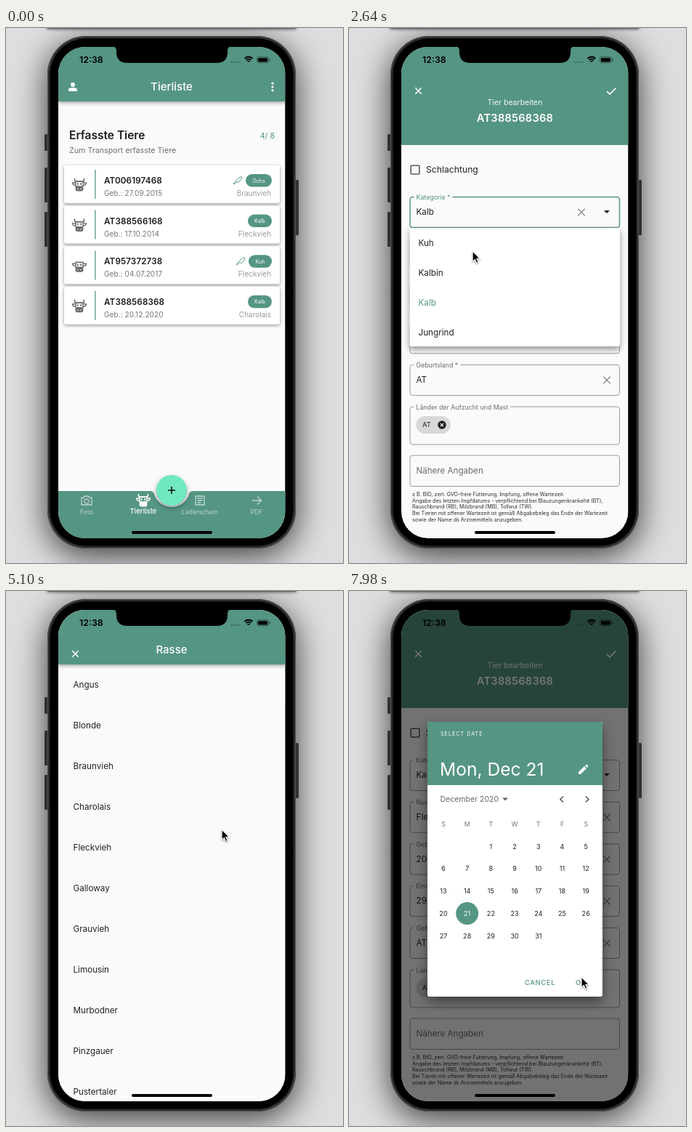
Recreate the animation shown at these times as an HTML page with a canvas. Size 464 px wide and 736 px high, loop 8000 ms.

```html
<!DOCTYPE html>
<html lang="de">
<head>
<meta charset="utf-8">
<title>Tierliste</title>
<style>
  html, body { margin: 0; width: 100%; height: 100%; overflow: hidden; background: #dedee1; }
  canvas { display: block; width: 464px; height: 736px; }
</style>
</head>
<body>
<canvas id="stage"></canvas>
<script>
const W = 464, H = 736, LOOP = 8000;
const canvas = document.getElementById('stage');
const ratio = window.devicePixelRatio || 1;
canvas.width = W * ratio;
canvas.height = H * ratio;
const c = canvas.getContext('2d');

const TEAL = '#559583', PAPER = '#fafafa', INK = '#222', GREY = '#757575';
const LEFT = 72, TOP = 26, WIDE = 312.5, TALL = 676;

const clamp = (v, lo = 0, hi = 1) => Math.min(hi, Math.max(lo, v));
const ramp = (t, a, b) => clamp((t - a) / (b - a));
const mix = (a, b, k) => a + (b - a) * k;
const smooth = k => k * k * (3 - 2 * k);

// ---------- drawing helpers ----------
function text(str, x, middle, size, color, { weight = 400, align = 'left', spacing = 0 } = {}) {
  c.font = `${weight} ${size}px Inter, "Open Sans", sans-serif`;
  c.letterSpacing = spacing + 'px';
  c.textAlign = align;
  c.fillStyle = color;
  c.fillText(str, x, middle + size * 0.36);
}
function box(x, y, w, h, r, fill, stroke, width = 1) {
  c.beginPath();
  c.roundRect(x, y, w, h, r);
  if (fill) { c.fillStyle = fill; c.fill(); }
  if (stroke) { c.strokeStyle = stroke; c.lineWidth = width; c.stroke(); }
}
function disc(x, y, r, fill) {
  c.beginPath();
  c.arc(x, y, r, 0, 7);
  c.fillStyle = fill;
  c.fill();
}
function icon(d, x, y, { stroke, fill, width = 1.3 }) {
  const path = new Path2D(d);
  group(() => {
    c.translate(x, y);
    c.lineWidth = width;
    if (fill) { c.fillStyle = fill; c.fill(path); }
    if (stroke) { c.strokeStyle = stroke; c.stroke(path); }
  });
}
function group(draw) { c.save(); draw(); c.restore(); }
function shadowed(blur, dy, alpha, draw) {
  group(() => {
    c.shadowBlur = blur * ratio;
    c.shadowOffsetY = dy * ratio;
    c.shadowColor = `rgba(0,0,0,${alpha})`;
    draw();
  });
}
const cross = (x, y, r, stroke, width = 1.2) =>
  icon(`M${-r} ${-r}L${r} ${r}M${r} ${-r}L${-r} ${r}`, x, y, { stroke, width });
const triangle = (x, y) => icon('M-4-2H4L0 2Z', x, y, { fill: INK });

function cow(x, y, color, horns = true) {
  if (horns) icon('M-6-9C-8-4-4-5-2-5H2C4-5 8-4 6-9', x, y, { stroke: color, width: 1.6 });
  icon('M-5-5H5L5 2H-5ZM-5-3L-9.5-3Q-9 1-5 0M5-3L9.5-3Q9 1 5 0', x, y, { stroke: color, width: 1.4 });
  icon('M-4 2H4Q6 3 5.5 6Q5 8.5 3 8.5H-3Q-5 8.5-5.5 6Q-6 3-4 2ZM-3-3h1.6v3h-1.6zM1.4-3h1.6v3h-1.6z', x, y, { fill: color });
  disc(x - 2, y + 5.4, 0.8, '#fff');
  disc(x + 2, y + 5.4, 0.8, '#fff');
}

// ---------- phone ----------
function phoneBody() {
  c.fillStyle = '#dedee1';
  c.fillRect(0, 0, W, H);
  shadowed(46, 10, 0.75, () => box(57, 11, 342, 705, 53, '#29292b'));
  shadowed(4, 1, 0.6, () => box(56, -6, 344, 6.5, 2, '#444'));
  for (const [x, y, h] of [[53, 146, 23], [53, 192, 48], [53, 253, 48], [398, 209, 76]])
    box(x, y, 5, h, 1.5, '#303032');
  box(57.5, 11.5, 341, 704, 53, '#2c2c2e', '#555557');
  box(60.5, 14.5, 335, 698, 50, '#000');
}

function statusBar() {
  icon('M147 25Q152 26 152 31V33Q152 48 167 48H290Q305 48 305 33V31Q305 26 310 25Z', 0, 0, { fill: '#000' });
  text('12:38', 101, 44, 12.4, '#000', { weight: 600 });
  for (let i = 0; i < 4; i++) disc(310.5 + i * 3.7, 47, 1.1, 'rgba(0,0,0,.35)');
  c.lineCap = 'butt';
  for (const r of [3, 6, 9]) {
    c.beginPath();
    c.arc(334, 48, r - 0.8, -2.3, -0.84);
    c.strokeStyle = '#000';
    c.lineWidth = 2;
    c.stroke();
  }
  box(345.5, 39.8, 16, 8, 2.4, null, 'rgba(0,0,0,.45)');
  box(347, 41.2, 13, 5.2, 1.2, '#000');
  box(362.6, 42.3, 1.3, 3, 0.6, 'rgba(0,0,0,.5)');
  box(173, 692, 111, 4, 2, '#000');
}

// ---------- list page ----------
const animals = [
  ['AT006197468', '27.09.2015', 'Ochs', 'Braunvieh', 36, true],
  ['AT388566168', '17.10.2014', 'Kalb', 'Fleckvieh', 33, false],
  ['AT957372738', '04.07.2017', 'Kuh', 'Fleckvieh', 32, true],
  ['AT388568368', '20.12.2020', 'Kalb', 'Charolais', 33, false],
];

function appBar(title, y = TOP) {
  shadowed(5, 2, 0.35, () => box(LEFT, y, WIDE, 75, 0, TEAL));
  text(title, 228, y + 55, 15, '#fff', { weight: 500, align: 'center' });
}

function listPage() {
  box(LEFT, TOP, WIDE, TALL, 0, PAPER);
  appBar('Tierliste');
  disc(92, 78, 3, '#fff');
  icon('M-6 6V4Q-6 1 0 1Q6 1 6 4V6Z', 92, 81, { fill: '#fff' });
  for (const dy of [-4.8, 0, 4.8]) disc(367, 81 + dy, 1.6, '#fff');

  text('Erfasste Tiere', 87, 147, 15.5, '#1c1c1c', { weight: 600 });
  text('Zum Transport erfasste Tiere', 87, 168, 10.7, '#6d6d6d');
  text('4/ 8', 370, 148, 10.7, TEAL, { align: 'right' });

  animals.forEach(([tag, born, kind, breed, chip, knife], i) => {
    const y = 189 + i * 55.6;
    shadowed(4, 1.5, 0.4, () => box(80, y, 297, 52, 3, '#fff'));
    cow(101, y + 27, '#6b6b6b', i !== 2);
    box(122.3, y + 6, 1.3, 40, 0, TEAL);
    text(tag, 135, y + 21, 11.7, '#1c1c1c', { weight: 600, spacing: 0.1 });
    text('Geb.: ' + born, 135, y + 38.3, 10, '#757575', { spacing: 0.1 });
    box(366 - chip, y + 12, chip, 17.5, 8.7, TEAL);
    text(kind, 366 - chip / 2, y + 21, 7.2, '#fff', { align: 'center' });
    text(breed, 365, y + 38.3, 10, '#9a9a9a', { align: 'right' });
    if (knife) icon('M-5 5L-1 1L1 2.5L6-3Q6-6 3-5L-2 0L-6 4Z', 353 - chip + 2, y + 21, { stroke: TEAL, width: 1 });
  });
  bottomNav();
}

function bottomNav() {
  icon(`M72 637H198Q203 637 204 641A25 25 0 0 0 252 641Q253 637 258 637H385V702H72Z`, 0, 0, { fill: TEAL });
  const pale = 'rgba(255,255,255,.62)';
  icon('M-7-4H-4L-2.5-6H2.5L4-4H7V6H-7Z', 111, 650, { stroke: pale });
  c.beginPath();
  c.arc(111, 651, 3, 0, 7);
  c.stroke();
  icon('M3 0A3 3 0 1 1-3 0A3 3 0 1 1 3 0', 111, 651, { stroke: pale });
  cow(189, 650, '#fff');
  icon('M-6-6H6V6H-6ZM-3.5-3H3.5M-3.5 0H3.5M-3.5 3H1', 267, 650, { stroke: pale });
  icon('M-6 0H6M1-5.5L6.5 0L1 5.5', 345, 650, { stroke: pale });
  text('Foto', 111, 666, 8.6, pale, { align: 'center' });
  text('Tierliste', 189, 665, 9.6, '#fff', { weight: 500, align: 'center' });
  text('Lieferschein', 267, 666, 8.6, pale, { align: 'center' });
  text('PDF', 345, 666, 8.6, pale, { align: 'center' });
  shadowed(6, 3, 0.4, () => disc(228, 636, 21, '#70e8c2'));
  icon('M-5 0H5M0-5V5', 228, 636, { stroke: '#111', width: 1.6 });
}

// ---------- form page ----------
function field(label, value, y, h, { clearX = 355, focus = false } = {}) {
  box(84, y, 288.5, h, 3.5, null, focus ? TEAL : '#9a9a9a', focus ? 1.5 : 1);
  if (label) {
    c.font = '400 8.8px Inter, "Open Sans", sans-serif';
    c.letterSpacing = '0px';
    box(89.5, y - 2, c.measureText(label).width + 6, 4, 0, PAPER);
    text(label, 92.5, y + 0.5, 8.8, focus ? TEAL : '#6b6b6b');
  }
  if (value) {
    text(value, 92.5, y + 20.5, 11.7, INK);
    cross(clearX, y + 21, 4.8, '#777');
  }
}

function formPage(t) {
  box(LEFT, TOP, WIDE, TALL, 0, PAPER);
  box(LEFT, TOP, WIDE, 135, 0, TEAL);
  cross(95.5, 86.5, 4.2, '#fff', 1.5);
  icon('M-6 0L-2 4L6.5-4.5', 361, 87, { stroke: '#fff', width: 1.6 });
  text('Tier bearbeiten', 228.5, 102, 10.5, '#f2f7f5', { align: 'center' });
  text('AT388568368', 228.5, 124, 14.6, '#fff', { weight: 600, align: 'center', spacing: 0.25 });

  box(85.2, 189.2, 11.8, 11.8, 1, null, '#5c5c5c', 1.6);
  text('Schlachtung', 106, 195, 12.2, INK);
  field('Kategorie *', t >= 3300 ? 'Kalbin' : 'Kalb', 232.5, 42, { clearX: 320, focus: t >= 1800 && t < 3180 });
  triangle(355, 253);
  field('Rasse *', t >= 5340 ? 'Fleckvieh' : 'Charolais', 290.3, 42);
  field('Geburtsdatum *', '20.12.2020', 348.1, 42);
  field('Einstelldatum', '29.12.2020', 405.7, 42);
  field('Geburtsland *', 'AT', 463.4, 42);
  field('Länder der Aufzucht und Mast', '', 521, 52);
  box(92.5, 534, 47.5, 24, 12, '#d8d8d8');
  text('AT', 101, 546, 9.4, INK);
  disc(128, 546, 5.7, '#1c1c1c');
  cross(128, 546, 2.2, '#fff', 1.2);
  field('', '', 588, 42.5);
  text('Nähere Angaben', 92.5, 609, 11.6, '#6b6b6b');
  [
    'z.B. BIO, zert. GVO-freie Fütterung, Impfung, offene Wartezeit.',
    'Angabe des letzten Impfdatums - verpflichtend bei Blauzungenkrankehit (BT),',
    'Rauschbrand (RB), Milzbrand (MB), Tollwut (TW).',
    'Bei Tieren mit offener Wartezeit ist gemäß Abgabebeleg das Ende der Wartezeit',
    'sowie der Name ds Arzneimittels anzugeben.',
  ].forEach((line, i) => text(line, 87, 641.3 + i * 8.7, 7.15, '#2e2e2e'));
}

function categoryMenu(t) {
  const size = ramp(t, 1860, 2005);
  const alpha = 1 - ramp(t, 3480, 3640);
  if (!size || !alpha) return;
  group(() => {
    c.globalAlpha = alpha;
    shadowed(9, 4, 0.42, () => box(83.5, 275, 289.5 * size, 163 * size, 2, '#fff'));
    box(83.5, 316.5, 289.5 * ramp(t, 3060, 3546), 40.5, 0, '#f7f7f7');
    c.globalAlpha = alpha * ramp(t, 2160, 2280) * (1 - ramp(t, 3240, 3540));
    ['Kuh', 'Kalbin', 'Kalb', 'Jungrind'].forEach((name, i) =>
      text(name, 95.5, 296 + i * 40.8, 11.7, i === 2 ? TEAL : INK));
  });
}

// ---------- breed sheet ----------
const breeds = ['Angus', 'Blonde', 'Braunvieh', 'Charolais', 'Fleckvieh', 'Galloway',
  'Grauvieh', 'Limousin', 'Murbodner', 'Pinzgauer', 'Pustertaler'];

function breedSheet(t) {
  const opened = 1 - (1 - ramp(t, 4590, 4980)) ** 3;
  const closed = 1 - (1 - ramp(t, 5440, 5800)) ** 2;
  const shown = opened * (1 - closed);
  if (!shown) return;
  const y = mix(702, 18, shown);
  box(LEFT, y, WIDE, 8, 0, '#565a59');
  box(LEFT, y + 8, WIDE, TALL, 0, PAPER);
  appBar('Rasse', y + 8);
  cross(95.5, y + 68.5, 4.2, '#fff', 1.5);
  if (t >= 5340) box(LEFT, y + 307, WIDE, 56, 0, '#ececec');
  breeds.forEach((name, i) => text(name, 92.5, y + 111 + i * 56, 11.7, INK));
}

// ---------- date dialog ----------
function dateDialog(t) {
  const alpha = ramp(t, 6680, 6820);
  if (!alpha) return;
  const day = t >= 7500 ? 21 : 20;
  const column = i => 130 + i * 32.7;
  c.globalAlpha = alpha;
  box(LEFT, TOP, WIDE, TALL, 0, 'rgba(0,0,0,.54)');
  shadowed(16, 7, 0.45, () => box(108, 180, 241, 378, 3, '#fff'));
  box(108, 180, 241, 87, [3, 3, 0, 0], TEAL);
  text('SELECT DATE', 126, 196.5, 7.2, '#fff', { spacing: 1 });
  text(day === 21 ? 'Mon, Dec 21' : 'Sun, Dec 20', 125, 245.5, 24.6, '#fff');
  icon('M-6 6V3L2-5L5-2L-3 6ZM3-6L4.5-7Q5.5-7.5 6.5-6.5Q7.5-5.5 7-4.5L6-3Z', 322, 246, { fill: '#fff' });
  text('December 2020', 125.5, 286, 10.5, '#666');
  icon('M-4-2H4L0 2Z', 215, 286.5, { fill: '#666' });
  icon('M2-4L-2 0L2 4', 293, 286.5, { stroke: '#555', width: 1.5 });
  icon('M-2-4L2 0L-2 4', 328, 286.5, { stroke: '#555', width: 1.5 });
  [...'SMTWTFS'].forEach((d, i) => text(d, column(i), 321, 8.8, '#777', { align: 'center' }));
  for (let d = 1; d <= 31; d++) {
    const x = column((d + 1) % 7), y = 351.5 + Math.floor((d + 1) / 7) * 30.7;
    if (d === day) disc(x, y, 15.5, TEAL);
    text(String(d), x, y, 9.1, d === day ? '#fff' : INK, { align: 'center' });
  }
  text('CANCEL', 242, 539, 9.3, TEAL, { weight: 500, spacing: 0.7 });
  text('OK', 312, 539, 9.3, TEAL, { weight: 500, spacing: 0.7 });
  c.globalAlpha = 1;
}

// ---------- pointer ----------
// start, end, x, y: the pointer glides to (x, y) between the two times
const moves = [
  [60, 720, 246, 390], [1560, 1800, 200, 257], [2220, 2940, 152, 337],
  [3780, 4440, 357, 314], [4980, 5300, 167.5, 358.5], [6240, 6640, 206, 377],
  [7080, 7440, 165, 441], [7680, 7950, 320, 531],
];
function pointer(t) {
  let x = 300, y = 740;
  for (const [a, b, toX, toY] of moves) {
    const k = smooth(ramp(t, a, b));
    x = mix(x, toX, k);
    y = mix(y, toY, k);
  }
  shadowed(2, 1, 0.35, () =>
    icon('M0 0V14.5L3.3 11.5L5.5 16.6L8.1 15.5L5.9 10.5H10.4Z', x, y, { fill: '#000', stroke: '#fff', width: 1.2 }));
}

const pauses = [
  [0, 60], [840, 960], [1320, 1620], [1980, 2220], [3360, 3480], [3660, 3840], [4620, 4740],
  [4740, 5100], [5100, 5340], [5340, 5700], [5820, 6300], [6660, 6840], [6840, 7140], [7560, 7740],
];
function recordedTime(now) {
  const t = now % LOOP;
  const pause = pauses.find(([a, b]) => t >= a && t < b);
  return pause ? pause[0] : Math.floor(t / 60) * 60;
}

function draw(t) {
  c.setTransform(ratio, 0, 0, ratio, 0, 0);
  phoneBody();
  group(() => {
    c.beginPath();
    c.roundRect(LEFT, TOP, WIDE, TALL, 37);
    c.clip();
    const slide = 1 - (1 - ramp(t, 840, 1240)) ** 6;
    if (slide < 1) group(() => { c.translate(-104 * slide, 0); listPage(); });
    if (slide > 0) group(() => {
      c.translate(312 * (1 - slide), 0);
      const shade = c.createLinearGradient(LEFT - 16, 0, LEFT, 0);
      shade.addColorStop(0, 'rgba(0,0,0,0)');
      shade.addColorStop(1, 'rgba(0,0,0,.18)');
      box(LEFT - 16, TOP, 16, TALL, 0, shade);
      formPage(t);
      categoryMenu(t);
    });
    breedSheet(t);
    dateDialog(t);
    statusBar();
  });
  pointer(t);
}

const start = performance.now();
function tick() {
  draw(recordedTime(performance.now() - start));
  requestAnimationFrame(tick);
}
tick();
</script>
</body>
</html>
```
